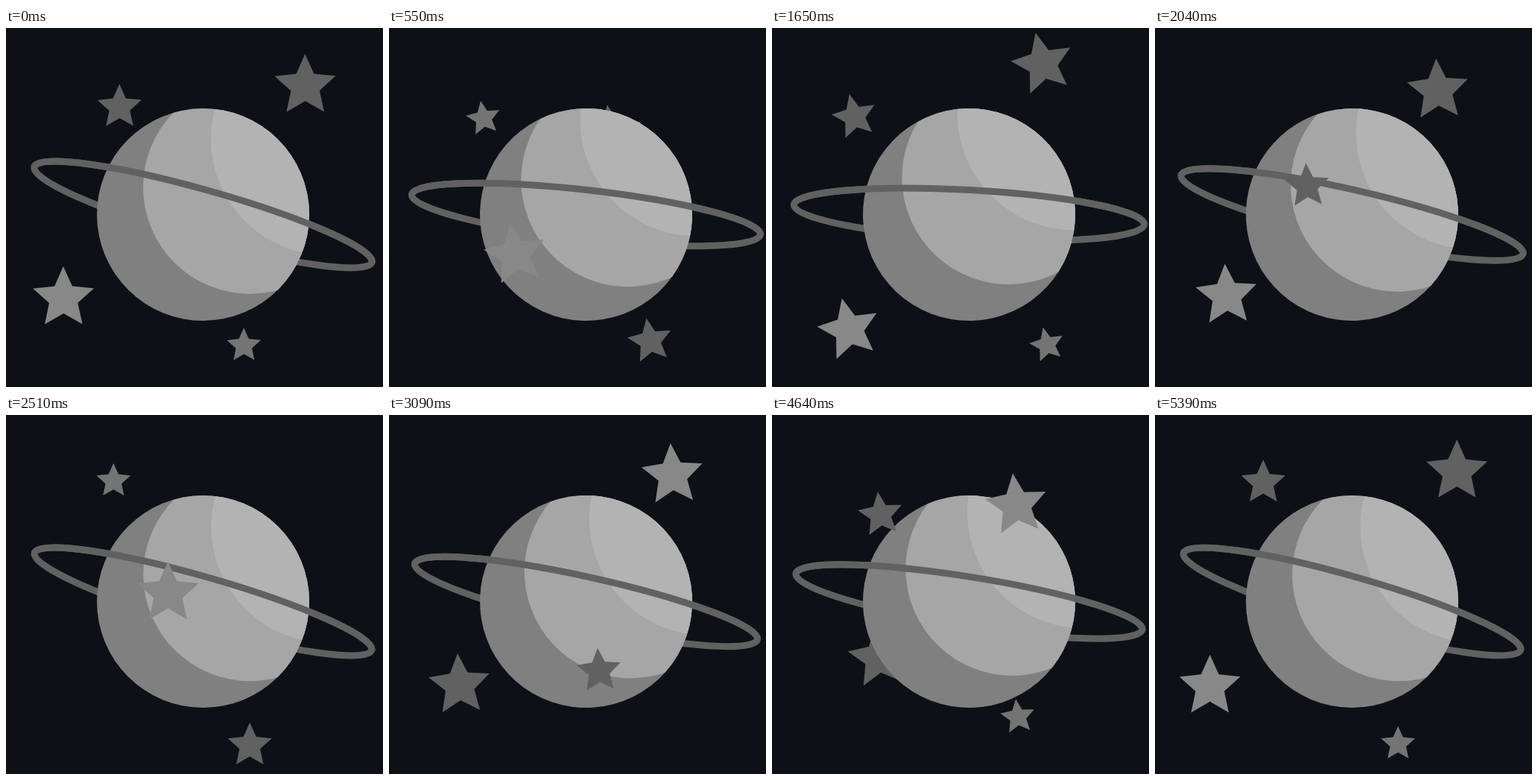
An HTML page that plays this animation: 506x482 px, repeating every 5420 ms.

```html
<!DOCTYPE html>
<html lang="en">
<head>
<meta charset="utf-8">
<title>Ringed planet</title>
<style>
  html, body { margin: 0; width: 100%; height: 100%; overflow: hidden; background: #0d1117; }
  svg { display: block; width: 506px; height: 482px; }
  .ring { fill: none; stroke: #616161; stroke-width: 9; }
</style>
</head>
<body>
<svg viewBox="0 0 506 482">
  <defs>
    <clipPath id="disc"><circle r="142.5"/></clipPath>
    <polygon id="star"/>
  </defs>
  <g transform="translate(264.5 250.5)">
    <g id="scene">
      <use id="bigBack" href="#star" fill="#616161"/>
      <use id="smallBack" href="#star" fill="#747474"/>
      <ellipse class="ring" rx="235.5" ry="33" transform="rotate(16.1)"/>
      <circle r="142.5" fill="#808080"/>
      <g clip-path="url(#disc)">
        <circle cx="63" cy="-36.5" r="143.3" fill="#a6a6a6"/>
        <circle cx="167" cy="-100.5" r="156" fill="#b3b3b3"/>
      </g>
      <path class="ring" d="M-235.5 0A235.5 33 0 0 1 235.5 0" transform="rotate(16.1)"/>
      <use id="bigFront" href="#star" fill="#888"/>
      <use id="smallFront" href="#star" fill="#616161"/>
    </g>
  </g>
</svg>
<script>
const LOOP = 5420;
const BEAT = 917;      // ms for one pass of a small star
const START = 0.215;   // beats already elapsed when the loop begins
const SWING = 15.4;    // degrees

const $ = id => document.getElementById(id);
const mix = (a, b, u) => a + (b - a) * u;

// star of unit radius
$('star').setAttribute('points', Array.from({ length: 10 }, (_, i) => {
  const a = i * Math.PI / 5, r = i % 2 ? 0.47 : 1;
  return [(r * Math.sin(a)).toFixed(4), (-r * Math.cos(a)).toFixed(4)];
}).join(' '));

// cubic-bezier(.65, 0, .35, 1)
function ease(x) {
  let lo = 0, hi = 1;
  for (let i = 0; i < 24; i++) {
    const t = (lo + hi) / 2, s = 1 - t;
    if (3 * s * s * t * 0.65 + 3 * s * t * t * 0.35 + t * t * t < x) lo = t;
    else hi = t;
  }
  return lo * lo * (3 - 2 * lo);
}

const bigPath = [[-191.5, 114.5], [141.5, -175]];
const smallPath = [[-120.5, -162.5], [63, 194]];
const stars = [
  { el: $('bigFront'), path: bigPath, size: 43, beats: 2 },
  { el: $('bigBack'), path: [...bigPath].reverse(), size: 43, beats: 2 },
  { el: $('smallFront'), path: smallPath, size: 31, beats: 1 },
  { el: $('smallBack'), path: [...smallPath].reverse(), size: 24, beats: 1 }
];

function draw(ms) {
  const beat = START + ms / BEAT;
  for (const { el, path: [a, b], size, beats } of stars) {
    const u = ease(beat % beats / beats);
    el.setAttribute('transform',
      `translate(${mix(a[0], b[0], u)} ${mix(a[1], b[1], u)}) scale(${size})`);
  }
  const turn = beat / 1.5 % 2;
  const swing = ease(turn < 1 ? turn : 2 - turn);
  $('scene').setAttribute('transform', `rotate(${-SWING * swing})`);
}

const origin = performance.now();
function tick() {
  draw((performance.now() - origin) % LOOP);
  requestAnimationFrame(tick);
}
tick();
</script>
</body>
</html>
```
